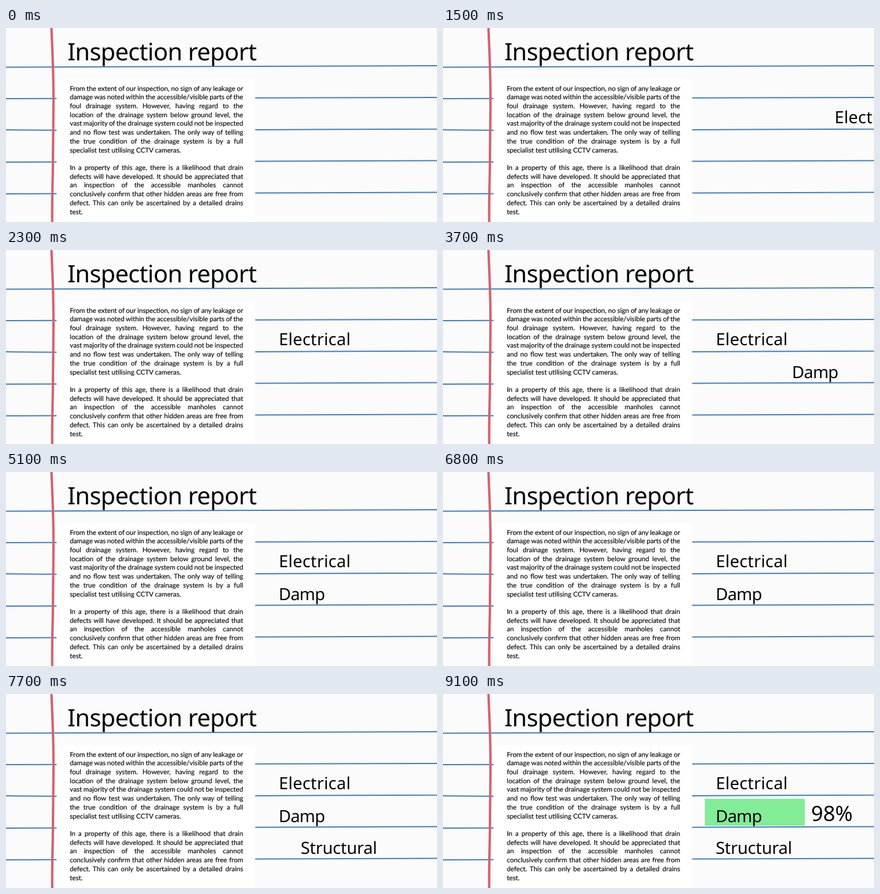
Animation of 716x324 px, one loop 10000 ms. Source, as an HTML page:

```html
<!DOCTYPE html>
<html lang="en">
<head>
<meta charset="utf-8">
<title>Inspection report</title>
<style>
  html, body { margin: 0; width: 100%; height: 100%; overflow: hidden; background: #fbfbfb; }
  svg { display: block; }
  text { font-family: "Noto Sans", sans-serif; fill: #050505; text-rendering: geometricPrecision; }
  #report text { font: 11.2px Lato, sans-serif; fill: #111; stroke: #111; stroke-width: .2px; }
  .item { font-size: 28px; }
</style>
</head>
<body>
<svg width="716" height="324" viewBox="0 0 716 324">
  <rect width="716" height="324" fill="#fbfbfb"/>
  <g fill="none" stroke="#4380c0" stroke-width="2">
    <path d="M0 65.4 Q360 64.2 716 63.1"/>
    <path d="M0 118 Q360 117.4 716 116"/>
    <path d="M0 170 Q90 171.6 414 170 T716 168.7"/>
    <path d="M0 224 Q360 222.8 716 221.6"/>
    <path d="M0 277 Q360 276 716 274.5"/>
  </g>
  <rect x="84" y="86" width="330" height="238" fill="#fff"/>
  <path d="M75.5 -2 C76.5 30 78.5 60 78.8 105 S78 190 78 220 S76.2 280 76.8 326"
        fill="none" stroke="#d4626f" stroke-width="4"/>
  <text x="102" y="53.6" font-size="40" letter-spacing="-.7">Inspection report</text>
  <g id="report"></g>
  <g id="result">
    <rect x="435" y="175" width="166" height="45" fill="#82ec97"/>
    <text x="611.5" y="211.7" font-size="35">98%</text>
  </g>
  <text class="item" x="453.3" y="158.5" letter-spacing=".2">Electrical</text>
  <text class="item" x="453" y="214" letter-spacing="-.8">Damp</text>
  <text class="item" x="453" y="267" letter-spacing="-.25">Structural</text>
</svg>
<script>
const LOOP = 10000;
const SLIDE_TIME = 1000;
const SLIDE_DISTANCE = 263;
const SLIDE_STARTS = [1295, 3259, 6907];
const RESULT_START = 8900;

const paragraphs = [
  `From the extent of our inspection, no sign of any leakage or
damage was noted within the accessible/visible parts of the
foul drainage system. However, having regard to the
location of the drainage system below ground level, the
vast majority of the drainage system could not be inspected
and no flow test was undertaken. The only way of telling
the true condition of the drainage system is by a full
specialist test utilising CCTV cameras.`,
  `In a property of this age, there is a likelihood that drain
defects will have developed. It should be appreciated that
an inspection of the accessible manholes cannot
conclusively confirm that other hidden areas are free from
defect. This can only be ascertained by a detailed drains
test.`
];

const report = document.getElementById('report');
const result = document.getElementById('result');
const items = [...document.querySelectorAll('.item')];

// Justify every line except the last of each paragraph.
function layOutReport(left, top, width, lineHeight) {
  let y = top;
  for (const paragraph of paragraphs) {
    const lines = paragraph.split('\n');
    lines.forEach((line, i) => {
      const text = document.createElementNS('http://www.w3.org/2000/svg', 'text');
      text.setAttribute('x', left);
      text.setAttribute('y', y);
      text.textContent = line;
      report.append(text);
      if (i < lines.length - 1) {
        const gaps = line.split(' ').length - 1;
        text.style.wordSpacing = (width - text.getComputedTextLength()) / gaps + 'px';
      }
      y += lineHeight;
    });
    y += lineHeight;
  }
}

function draw(now) {
  const time = now % LOOP;
  items.forEach((item, i) => {
    const progress = Math.min(1, Math.max(0, (time - SLIDE_STARTS[i]) / SLIDE_TIME));
    const offset = SLIDE_DISTANCE * (1 - progress) ** 1.25;
    item.setAttribute('transform', `translate(${offset} 0)`);
    item.setAttribute('visibility', progress > 0 ? 'visible' : 'hidden');
  });
  result.setAttribute('visibility', time >= RESULT_START ? 'visible' : 'hidden');
}

layOutReport(106, 104.5, 288, 14.72);

const start = performance.now();
function tick() {
  draw(performance.now() - start);
  requestAnimationFrame(tick);
}
tick();
</script>
</body>
</html>
```
